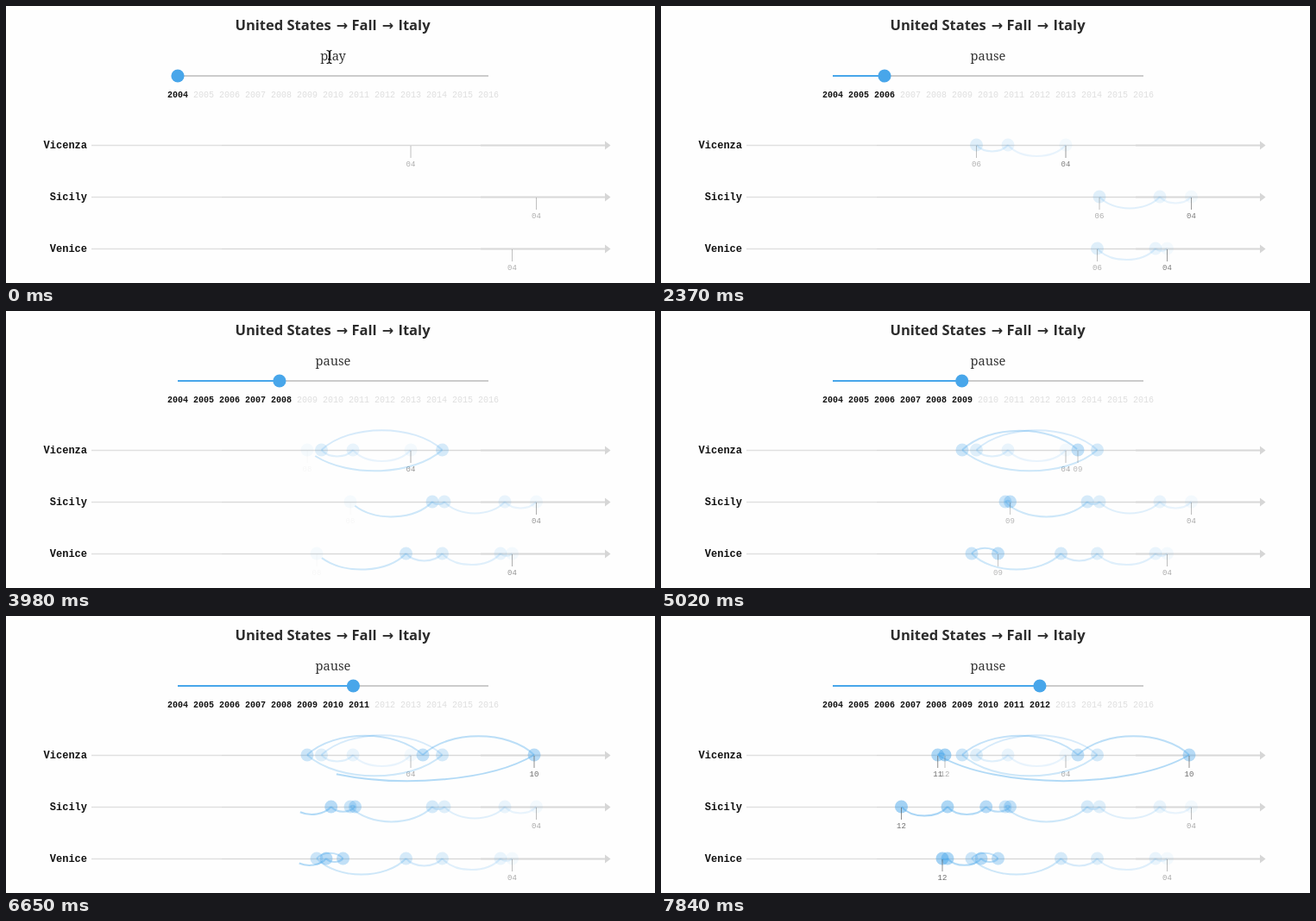
Write an HTML page that moves like this. It is 752 px wide and 321 px high and loops after 7.99 s.

```html
<!DOCTYPE html>
<html lang="en">
<head>
<meta charset="utf-8">
<title>Timeline</title>
<style>
  html, body { margin: 0; width: 100%; height: 100%; overflow: hidden; background: #fefefe; }
  svg { display: block; width: 752px; height: 321px; }
  text { text-anchor: middle; }
  .title { font: bold 16.5px "Open Sans", sans-serif; fill: #2b2b2b; }
  .title text { text-anchor: start; }
  .title .arrow { font: bold 16px "DejaVu Sans", sans-serif; text-anchor: middle; }
  .button { font: 14.6px "Noto Serif", serif; fill: #333; }
  .year { font: 10px "Liberation Mono", monospace; fill: #dedede; }
  .year.on { font-weight: bold; fill: #111; }
  .name { font: bold 12px "Liberation Mono", monospace; fill: #111; text-anchor: end; }
  .tick text { font: 9px "Liberation Mono", monospace; fill: #222; }
  .tick line { stroke: #555; }
  .arc { fill: none; stroke: #48a6ea; stroke-width: 2; }
</style>
</head>
<body>
<svg viewBox="0 0 752 321">
  <g class="title">
    <text x="265.5" y="28">United States</text>
    <text class="arrow" x="389.5" y="28">→</text>
    <text x="400.5" y="28">Fall</text>
    <text class="arrow" x="442.5" y="28">→</text>
    <text x="454.5" y="28">Italy</text>
  </g>
  <text id="button" class="button" x="379" y="63">play</text>
  <path d="M199 81H559" stroke="#ccc" stroke-width="2"/>
  <path id="bar" stroke="#48a6ea" stroke-width="2"/>
  <circle id="knob" cy="81" r="7.6" fill="#48a6ea"/>
  <g id="years"></g>
  <g id="rows"></g>
  <path id="cursor" d="M-3 -7.5Q0 -7.5 0 -5.5Q0 -7.5 3 -7.5M0 -6V6M-3 7.5Q0 7.5 0 5.5Q0 7.5 3 7.5M-1.5 2.5H1.5"
        fill="none" stroke="#111" stroke-width="1.2"/>
</svg>
<script>
const LOOP = 7990, STEP = LOOP / 54;
const FIRST_MOVE = 560, PERIOD = 924, DURATION = 895, CLICK = 880, CURSOR_GONE = 1470;
const BLUE = '#48a6ea';

const series = [
  { name: 'Vicenza', y: 161, xs: [469, 402, 365.5, 505.5, 349, 483, 612, 320.7, 329] },
  { name: 'Sicily', y: 221, xs: [614.5, 578, 508, 494, 399, 404.5, 376.7, 332, 278.5] },
  { name: 'Venice', y: 281, xs: [586.5, 573, 505.5, 463.5, 360, 390.5, 371, 332, 326] }
];

const $ = id => document.getElementById(id);
const clamp = v => Math.min(1, Math.max(0, v));
const ramp = (v, from, to) => clamp((v - from) / (to - from));
const cubicInOut = t => t < .5 ? 4 * t ** 3 : 1 - 4 * (1 - t) ** 3;

function add(parent, tag, attrs, text) {
  const el = document.createElementNS('http://www.w3.org/2000/svg', tag);
  for (const key in attrs) el.setAttribute(key, attrs[key]);
  if (text) el.textContent = text;
  return parent.appendChild(el);
}

// Moves to the right bow upwards, moves to the left bow downwards.
function arcPath(x1, x2, y) {
  const w = x2 - x1;
  const depth = 31.5 * Math.tanh(Math.abs(w) / 153);
  const cy = y - Math.sign(w) * depth * 4 / 3;
  return `M${x1} ${y}C${x1 + w * .23} ${cy} ${x2 - w * .23} ${cy} ${x2} ${y}`;
}

const years = Array.from({ length: 13 }, (_, i) =>
  add($('years'), 'text', { class: 'year', x: 199 + 30 * i, y: 105.5 }, String(2004 + i)));

const marks = [];
for (const { name, y, xs } of series) {
  const row = add($('rows'), 'g', {});
  add(row, 'text', { class: 'name', x: 94, y: y + 4 }, name);
  for (const [from, to, color, width] of [[99, 250, '#e0e0e0', 1.6], [250, 550, '#d9d9d9', 1.6], [550, 695, '#d8d8d8', 2]])
    add(row, 'path', { d: `M${from} ${y + .5}H${to}`, stroke: color, 'stroke-width': width });
  add(row, 'path', { d: `M694 ${y - 4.5}L700.5 ${y + .5}L694 ${y + 5.5}Z`, fill: '#d6d6d6' });

  const low = Math.min(...xs), high = Math.max(...xs);
  xs.forEach((x, i) => {
    const arc = i && add(row, 'path', {
      class: 'arc', d: arcPath(xs[i - 1], x, y), pathLength: 1, 'stroke-opacity': .07 + .05 * i
    });
    const dot = add(row, 'circle', { cx: x, cy: y, r: 7.5, fill: BLUE });
    const tick = add(row, 'g', { class: 'tick' });
    add(tick, 'line', { x1: x, x2: x, y1: y + 1, y2: y + 15 });
    add(tick, 'text', { x, y: y + 24.5 }, String(4 + i).padStart(2, '0'));
    marks.push({ i, arc, dot, tick, extreme: x === low || x === high });
  });
}

function firstTickOpacity(time) {
  if (time < CLICK) return .36;
  return .46 + .12 * ramp(time, 1500, 2370) - .2 * ramp(time, 2800, 5000);
}

function render(time) {
  const playing = time >= CLICK;
  const phase = i => playing ? (time - FIRST_MOVE - (i - 1) * PERIOD) / DURATION : 0;
  const progress = i => cubicInOut(clamp(phase(i)));

  let value = 0;
  for (let i = 1; i <= 8; i++) value += progress(i);
  const x = 199 + 30 * value;
  $('knob').setAttribute('cx', x);
  $('bar').setAttribute('d', `M199 81H${x}`);
  $('button').textContent = playing ? 'pause' : 'play';
  years.forEach((el, i) => el.classList.toggle('on', i <= Math.round(value)));

  const glide = clamp(time / 590);
  $('cursor').setAttribute('transform', `translate(${374.5 + 5 * glide} ${59 + 6.5 * glide})`);
  $('cursor').style.display = time < CURSOR_GONE ? '' : 'none';

  for (const { i, arc, dot, tick, extreme } of marks) {
    const p = phase(i);
    const shown = i ? ramp(p, .72, .84) : +playing;
    dot.setAttribute('opacity', shown * (.06 + .055 * i));
    if (arc) {
      const drawn = progress(i);
      arc.setAttribute('stroke-dasharray', `${drawn} 2`);
      arc.style.display = drawn > .002 ? '' : 'none';
    }
    const kept = extreme ? 1 : 1 - ramp(phase(i + 1), .15, .4);
    tick.setAttribute('opacity', i
      ? ramp(p, .73, .88) * kept * (extreme ? .65 : .36)
      : firstTickOpacity(time));
  }
}

function frame() {
  const now = performance.now() % LOOP;
  render(Math.min(53, Math.floor((now + 15) / STEP)) * STEP);
  requestAnimationFrame(frame);
}
frame();
</script>
</body>
</html>
```
